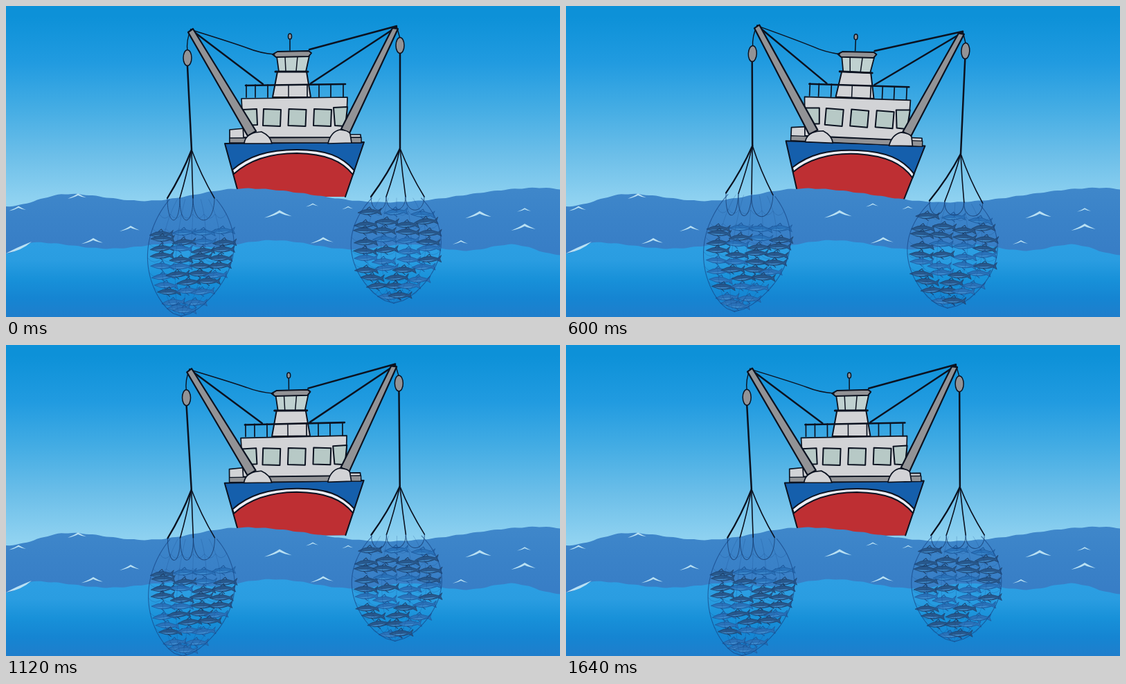
These frames come from a looping animation (800x450 px, 1.68 s). An HTML page with a canvas:

```html
<!DOCTYPE html>
<html lang="en">
<head>
<meta charset="utf-8">
<title>Fishing boat</title>
<style>
html, body { margin: 0; width: 100%; height: 100%; overflow: hidden; }
canvas { display: block; width: 800px; height: 450px; }
</style>
</head>
<body>
<canvas id="stage" width="800" height="450"></canvas>
<script>
const ctx = document.getElementById('stage').getContext('2d');
const LOOP = 1680, STEP = 40;
const PIVOT = { x: 398, y: 232 };
const INK = '#0b1220', LIGHT = '#d2d3d6', GREY = '#929396', GLASS = '#b7c9c6', FOAM = '#b9e0f3';
ctx.lineJoin = ctx.lineCap = 'round';

function shape(d, fill, line = 0, color = INK) {
  const path = new Path2D(d);
  if (fill) { ctx.fillStyle = fill; ctx.fill(path); }
  if (line) { ctx.lineWidth = line; ctx.strokeStyle = color; ctx.stroke(path); }
}

function oval(x, y, rx, ry) {
  ctx.beginPath();
  ctx.ellipse(x, y, rx, ry, 0, 0, Math.PI * 2);
  ctx.fillStyle = GREY;
  ctx.fill();
  ctx.lineWidth = 1.5;
  ctx.strokeStyle = INK;
  ctx.stroke();
}

function gradient(y0, y1, ...colors) {
  const g = ctx.createLinearGradient(0, y0, 0, y1);
  colors.forEach((c, i) => g.addColorStop(i / (colors.length - 1), c));
  return g;
}

function seeded(seed) {
  return () => {
    seed = (seed * 16807) % 2147483647;
    return seed / 2147483647;
  };
}

const polyline = points => 'M' + points.map(p => p.join(' ')).join('L');
const ease = p => (1 - Math.cos(Math.PI * p)) / 2;

// Fills below a wave line that eases from one turning point to the next.
function water(turns, fill) {
  const line = [[0, 450]];
  for (let i = 1; i < turns.length; i++) {
    const [x0, y0] = turns[i - 1], [x1, y1] = turns[i];
    for (let x = x0; x <= x1; x += 5)
      line.push([x, y0 + (y1 - y0) * ease((x - x0) / (x1 - x0)) + Math.sin(x * .23) * .5]);
  }
  shape(polyline([...line, [800, 450]]) + 'Z', fill);
}

function foam(x, y, w) {
  const h = w * .25;
  shape(`M${x - w} ${y + h}Q${x - w * .35} ${y} ${x} ${y - h}Q${x + w * .4} ${y} ${x + w * .8} ${y + h * .6}` +
    `Q${x + w * .3} ${y + h * .3} ${x} ${y - h * .3}Q${x - w * .4} ${y + h * .6} ${x - w} ${y + h}Z`, FOAM);
}

function drawSky() {
  ctx.fillStyle = gradient(15, 285, '#0d91d8', '#219be0', '#45ade4', '#6dbfe9', '#91d3f1');
  ctx.fillRect(0, 0, 800, 450);
}

const CREST = [[0, 290], [90, 272], [200, 282], [345, 264], [550, 284], [775, 263], [800, 265]];
const SWELL = [[0, 358], [40, 342], [150, 351], [240, 344], [290, 349], [385, 339], [500, 352], [580, 345], [665, 354], [730, 345], [800, 360]];
const CAPS = [[395, 301], [684, 302], [749, 320], [458, 339], [126, 340], [180, 322], [104, 275], [18, 293], [657, 342], [749, 295], [443, 288], [494, 292]];

function drawSea() {
  water(CREST, gradient(265, 352, '#3f87ca', '#3a82c8', '#387ec6'));
  CAPS.forEach(([x, y], i) => foam(x, y, 22 - i * 1.2));
  water(SWELL, gradient(340, 450, '#2d9fe3', '#2a9de1', '#1891d9', '#1585d2', '#1f7ecc'));
  shape('M0 358Q14 350 37 341Q23 354 0 358Z', FOAM);
}

function drawHull() {
  shape('M316 199L517 197L490 276L337 276Z', '#155fac');
  shape('M328 242C350 221 378 211 420 211C462 211 486 224 501 243L490 276L337 276Z', '#be2f33');
  shape('M327 237C350 217 378 208 420 208C462 208 485 217 503 238L501 244C485 224 462 214 420 213C378 213 350 224 329 243Z', '#eceef6', 2);
  shape('M337 276L316 199L517 197L490 276', null, 2);
}

function drawCabin() {
  shape('M323 179L345 177L345 198L323 198Z', LIGHT, 1.7);
  shape('M488 186L512 186L513 198L488 198Z', LIGHT, 1.7);
  shape('M323 191L513 190L513 198L323 198Z', GREY, 1.3);
  shape('M340 134L493 132L491 190L343 190Z', LIGHT, 1.7);
  for (let i = 0; i < 3; i++) {
    const x = 371 + i * 36.5;
    shape(`M${x + 1} 149L${x + 26} 150L${x + 25} 174L${x} 173Z`, GLASS, 2);
  }
  shape('M341 150L362 149L363 172L341 173Z', GLASS, 2);
  shape('M473 147L493 146L490 174L475 173Z', GLASS, 2);
}

function drawBridge() {
  shape('M392 95L434 95L440 132L385 132Z', LIGHT, 2);
  shape('M391 73L438 72L433 95L394 95Z', '#bfd1d0', 1.8);
  shape('M403 74L404 94M421 73L419 94M410 64V49M408 115V132', null, 1.5);
  shape('M389 95H436', null, 3);
  shape('M385 70L392 66L437 65L441 68L437 73L390 74Z', GREY, 2);
  oval(410, 44, 2.5, 4);
  shape('M346 115L490 113', null, 2.6);
  for (const x of [347, 360, 378, 435, 452, 469, 487]) shape(`M${x} 114V132`, null, 1.7);
}

function drawBooms() {
  shape('M267 34L371 113M564 29L438 63M563 31L440 112', null, 2.5);
  shape('M269 35Q330 54 349 61Q366 68 388 70', null, 1.4);
  shape('M267 34Q260 49 262 66M564 29L569 47', null, 1.4);
  shape('M263 38L270 33L361 181L349 188Z', GREY, 2.2);
  shape('M558 32L566 33L496 184L484 178Z', GREY, 2.2);
  shape('M344 199Q345 187 360 183L369 182Q382 188 384 199Z', LIGHT, 1.7);
  shape('M465 199Q469 182 482 179Q495 180 497 185L499 198Z', LIGHT, 1.7);
}

function drawBoat() {
  drawHull();
  drawCabin();
  drawBridge();
  drawBooms();
}

const NETS = [
  { x: 270, top: 280, half: 62, height: 169, lean: -17, knot: [268, 208], pulley: [262, 75],
    strands: [-37, -19, 0, 31], sag: 58, fishTop: 327, seed: 7 },
  { x: 564, top: 278, half: 65, height: 152, lean: -4, knot: [569, 206], pulley: [569, 57],
    strands: [-37, -15, 13, 40], sag: 34, fishTop: 301, seed: 23 }
];

// Point on the bag: side runs from -1 to 1, v from the mouth (0) to the bottom (1).
function bagPoint(net, side, v) {
  const width = net.half * Math.max(0, Math.sin(Math.PI * (.12 + .88 * v))) ** .6;
  return [net.x + net.lean * v * v + side * width, net.top + net.height * v];
}

function bagLine(net, side) {
  return polyline(Array.from({ length: 41 }, (_, i) => bagPoint(net, side, i / 40)));
}

function drawMesh(net) {
  let d = '';
  for (let k = -2; k <= 2; k++) d += bagLine(net, k / 3);
  for (let row = 1; row < 8; row++) {
    const v = row / 8;
    const [left, y] = bagPoint(net, -1, v), [right] = bagPoint(net, 1, v);
    const span = (right - left) / 6;
    d += `M${left} ${y}` + `q${span / 2} 12 ${span} 0`.repeat(6);
  }
  shape(d, null, .7, 'rgba(24,72,135,.35)');
  shape(bagLine(net, -1) + bagLine(net, 1), null, 1.1, 'rgba(24,70,135,.7)');
}

function drawFish(x, y, tilt, dark) {
  const edge = dark ? '#1d3f68' : '#1d5799';
  ctx.save();
  ctx.translate(x, y);
  ctx.rotate(tilt);
  shape('M-16 1Q-8 -4 2 -4L13 -1L18 -5L16 0L18 5L12 2Q4 5 -6 4Z', dark ? '#28588c' : '#2a72b9', .7, edge);
  shape('M-12 2Q-3 2 9 1Q2 4 -6 3Z', '#4391d2');
  shape('M-3 -4L1 -7L3 -4M-2 4L2 7', null, 1, edge);
  ctx.restore();
}

function drawCatch(net) {
  const random = seeded(net.seed);
  const bottom = net.top + net.height - 11;
  const rows = Math.round((bottom - net.fishTop) / 12.5);
  for (let row = 0; row <= rows; row++) {
    const y = net.fishTop + (bottom - net.fishTop) * row / rows;
    const v = (y - net.top) / net.height;
    const [left] = bagPoint(net, -1, v), [right] = bagPoint(net, 1, v);
    const count = Math.max(2, Math.round((right - left) / 31));
    for (let i = 0; i < count; i++) {
      const p = count > 1 ? i / (count - 1) : .5;
      const x = left + 17 + (right - left - 34) * p + (random() - .5) * 7;
      drawFish(x, y + (random() - .5) * 7, (random() - .5) * .15, random() < .55);
    }
  }
}

function drawRopes({ x, top, knot: [kx, ky], pulley: [px, py], strands, sag }) {
  oval(px, py, 6, 11.5);
  shape(`M${px} ${py + 12}L${kx} ${ky}`, null, 2.5);
  strands.forEach((dx, i) => {
    const end = x + dx;
    shape(`M${kx} ${ky}Q${kx + (end - kx) * .4} ${ky + 36} ${end} ${top - 2}`, null, i ? 1.6 : 2.3);
    if (i) {
      const from = x + strands[i - 1];
      shape(`M${from} ${top - 2}C${from} ${top + sag * .7} ${end} ${top + sag * .7} ${end} ${top - 2}`, null, 1, 'rgba(22,58,108,.75)');
    }
  });
}

function drawNet(net) {
  drawCatch(net);
  drawMesh(net);
  drawRopes(net);
}

// Boat roll in radians: slow settling rise, then a smooth fall.
function roll(t) {
  const low = -.055, high = .028, peak = 680, trough = 1400;
  if (t > peak && t < trough) return high + (low - high) * ease((t - peak) / (trough - peak));
  const p = ((t - trough + LOOP) % LOOP) / (LOOP - trough + peak);
  return low + (high - low) * Math.sin(p * Math.PI / 2);
}

function rolled(angle, draw) {
  ctx.save();
  ctx.translate(PIVOT.x, PIVOT.y);
  ctx.rotate(angle);
  ctx.translate(-PIVOT.x, -PIVOT.y);
  draw();
  ctx.restore();
}

function render(now) {
  const t = Math.floor((now % LOOP) / STEP) * STEP;
  const angle = roll(t) - roll(0);
  drawSky();
  rolled(angle, drawBoat);
  drawSea();
  rolled(angle, () => NETS.forEach(drawNet));
}

const start = performance.now();
function tick() {
  render(performance.now() - start);
  requestAnimationFrame(tick);
}
tick();
</script>
</body>
</html>
```
